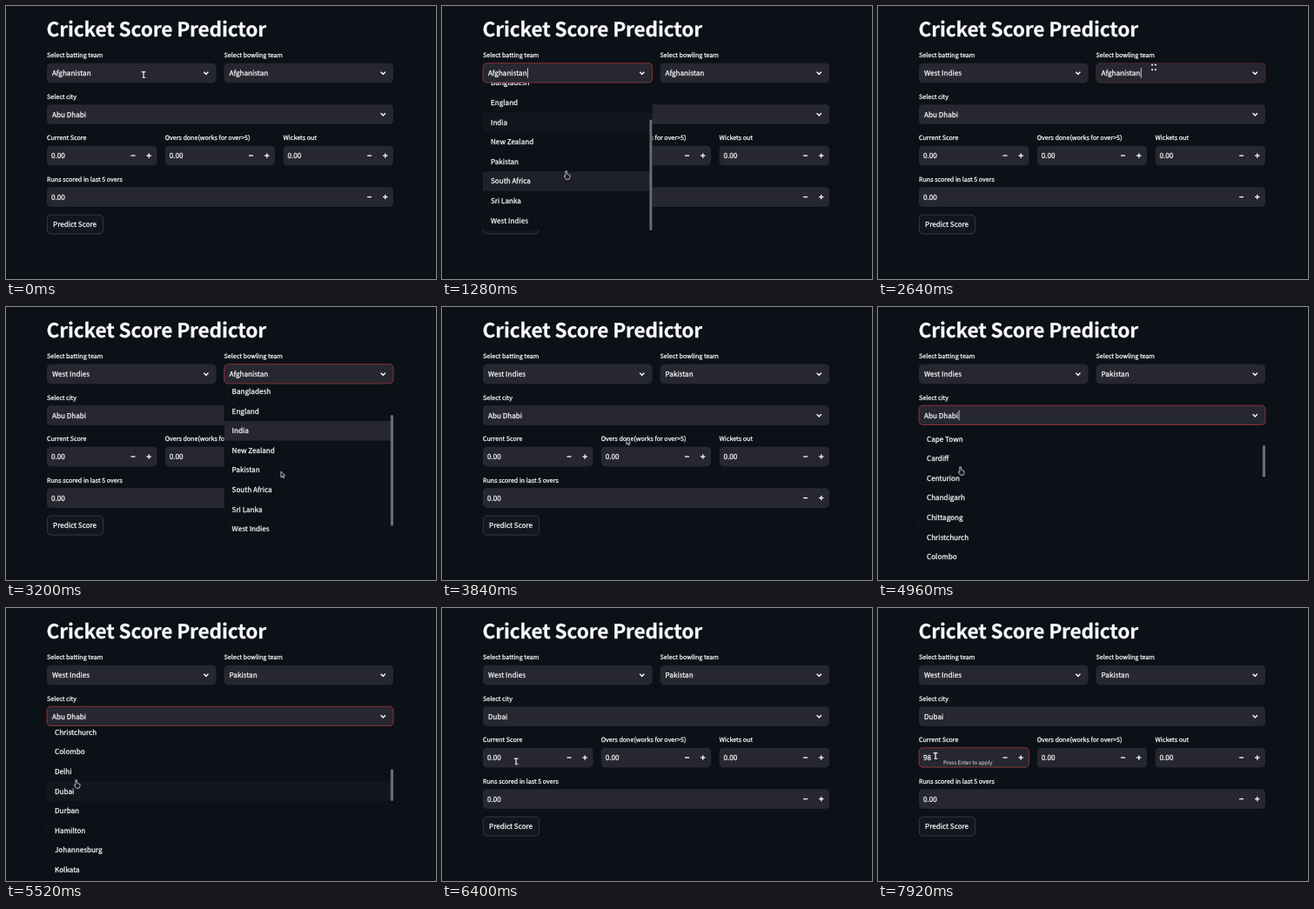
An HTML page with a canvas that plays this animation: 494 by 314 pixels, repeating every 8 s.

```html
<!DOCTYPE html>
<html lang="en">
<head>
<meta charset="utf-8">
<title>Cricket Score Predictor</title>
<style>
html, body { margin: 0; width: 100%; height: 100%; overflow: hidden; background: #0c1017; }
canvas { display: block; width: 494px; height: 314px; }
</style>
</head>
<body>
<canvas id="stage"></canvas>
<script>
const W = 494, H = 314, LOOP = 8000;
const BG = "#0c1017", FIELD = "#262730", TEXT = "#fafafa", FOCUS = "rgba(240,66,66,.65)";
const FAMILY = '"Noto Sans CJK SC","Noto Sans CJK JP","Noto Sans CJK","Noto Sans",sans-serif';
const BODY = 8.12, LABEL = 7.14, HINT = 6.1;
const ROW = 22.6, LIST_H = 169.6, FADE = 200;

const canvas = document.getElementById("stage");
const ctx = canvas.getContext("2d");
const dpr = window.devicePixelRatio || 1;
canvas.width = W * dpr;
canvas.height = H * dpr;

const teams = ["Afghanistan", "Australia", "Bangladesh", "England", "India", "New Zealand",
  "Pakistan", "South Africa", "Sri Lanka", "West Indies"];
const cities = ["Abu Dhabi", "Adelaide", "Auckland", "Bangalore", "Barbados", "Cape Town", "Cardiff",
  "Centurion", "Chandigarh", "Chittagong", "Christchurch", "Colombo", "Delhi", "Dubai", "Durban",
  "Hamilton", "Johannesburg", "Kolkata", "Lahore", "Lauderhill", "London", "Manchester", "Melbourne",
  "Mirpur", "Mount Maunganui", "Mumbai", "Nagpur", "Nottingham", "Pallekele", "Southampton",
  "St Kitts", "St Lucia", "Sydney", "Trinidad", "Wellington"];

const ramp = (t, a, b) => Math.min(1, Math.max(0, (t - a) / (b - a)));
const smooth = (t, a, b) => { const u = ramp(t, a, b); return u * u * (3 - 2 * u); };
const wheel = t => [4580, 4780, 4980, 5180].reduce((sum, s) => sum + smooth(t, s, s + 230), 0);

// hover: [time, row]; blink: [phase, half period]
const selects = [
  { x: 47, y: 65.8, w: 194.6, label: "Select batting team", items: teams, pick: 9,
    focus: 380, open: 460, close: 1920, blink: [600, 260],
    scroll: t => 56.4 * smooth(t, 840, 1120),
    hover: [[460, 0], [660, 1], [720, 2], [780, 3], [840, 4], [1130, 7], [1440, 8], [1560, 9]] },
  { x: 250.6, y: 65.8, w: 194.4, label: "Select bowling team", items: teams, pick: 6,
    focus: 2575, open: 2700, close: 3680, blink: [2560, 180],
    scroll: t => 56.4 * smooth(t, 3040, 3254),
    hover: [[2700, 0], [2880, 2], [2950, 4], [3290, 6]] },
  { x: 47, y: 113.3, w: 398, label: "Select city", items: cities, pick: 13,
    focus: 4040, open: 4160, close: 5760, blink: [4240, 250],
    scroll: t => 57.6 * wheel(t),
    hover: [[4160, 0], [4410, 1], [5470, 13]] }
];

const numbers = [
  { x: 47, y: 160.8, w: 126.5, label: "Current Score" },
  { x: 182.8, y: 160.8, w: 126.2, label: "Overs done(works for over>5)" },
  { x: 318.6, y: 160.8, w: 126.4, label: "Wickets out" },
  { x: 47, y: 208.3, w: 398, label: "Runs scored in last 5 overs" }
];
const ENTRY = { focus: 6640, select: 6880, first: 7760, second: 7840 };

// [time, x, y, shape]
const pointer = [
  [0, 158, 79, "beam"], [480, 158, 79, "beam"], [580, 156, 100, "hand"], [880, 144, 194.5, "hand"],
  [1280, 144, 194.5, "hand"], [1680, 110, 247, "hand"], [1920, 110, 247, "arrow"],
  [2240, 350, 32, "arrow"], [2320, 346, 36, "arrow"], [2480, 319, 68, "dots"],
  [2560, 317, 71, "dots"], [2720, 317, 71, "arrow"], [3020, 317.5, 193, "arrow"],
  [3680, 317.5, 193, "arrow"], [3980, 130, 125, "beam"], [4140, 130, 125, "hand"],
  [4400, 110, 174.5, "hand"], [4560, 110, 174.5, "hand"], [5360, 82, 202.5, "hand"],
  [5800, 82, 202.5, "arrow"], [6320, 90, 178, "beam"], [6600, 66, 170, "beam"], [LOOP, 66, 170, "beam"]
];

// A hairline stroke gives the letters a slightly heavier weight.
function text(str, x, y, size = BODY, color = TEXT, weight = 400) {
  ctx.font = `${weight} ${size}px ${FAMILY}`;
  ctx.fillStyle = ctx.strokeStyle = color;
  ctx.lineWidth = 0.25;
  ctx.fillText(str, x, y);
  ctx.strokeText(str, x, y);
}

function box(x, y, w, h, fill, stroke) {
  ctx.beginPath();
  ctx.roundRect(x, y, w, h, 4.5);
  if (fill) { ctx.fillStyle = fill; ctx.fill(); }
  if (stroke) { ctx.strokeStyle = stroke; ctx.lineWidth = 0.8; ctx.stroke(); }
}

function poly(points, closed) {
  ctx.beginPath();
  points.forEach(([x, y]) => ctx.lineTo(x, y));
  if (closed) ctx.closePath();
}

function line(points, width) {
  poly(points);
  ctx.strokeStyle = TEXT;
  ctx.lineWidth = width;
  ctx.stroke();
}

function withAlpha(alpha, paint) {
  if (alpha <= 0) return;
  ctx.save();
  ctx.globalAlpha *= alpha;
  paint();
  ctx.restore();
}

function focusRing(f, alpha) {
  withAlpha(alpha, () => box(f.x, f.y - 0.1, f.w, 22.4, null, FOCUS));
}

function drawSelect(s, t) {
  text(s.label, s.x, s.y - 6.5, LABEL);
  box(s.x, s.y, s.w, ROW, FIELD);
  const value = s.items[t < s.close ? 0 : s.pick], mid = s.y + 11.3;
  text(value, s.x + 6, mid + 2.9);
  const end = s.x + 6 + ctx.measureText(value).width;
  const cx = s.x + s.w - 11.8;
  line([[cx - 2.6, mid - 1.4], [cx, mid + 1.3], [cx + 2.6, mid - 1.4]], 1.4);
  focusRing(s, ramp(t, s.focus, s.focus + 160) * (1 - ramp(t, s.close, s.close + 160)));
  const lit = Math.floor((t - s.blink[0]) / s.blink[1]) % 2 === 0;
  if (lit && t >= s.focus && t < s.close) {
    ctx.fillStyle = TEXT;
    ctx.fillRect(end + 0.6, mid - 5.8, 0.8, 11.4);
  }
}

function drawList(s, t) {
  const alpha = ramp(t, s.open, s.open + 120) * (1 - ramp(t, s.close, s.close + 100));
  withAlpha(alpha, () => {
    const top = s.y + 22.7, scroll = s.scroll(t), total = s.items.length * ROW;
    ctx.beginPath();
    ctx.rect(s.x, top, s.w, LIST_H);
    ctx.clip();
    ctx.fillStyle = BG;
    ctx.fillRect(s.x - 1, top, s.w + 2, LIST_H);
    s.hover.forEach(([start, row], i) => {
      const next = s.hover[i + 1];
      const on = i ? ramp(t, start, start + FADE) : 1;
      const off = next ? ramp(t, next[0], next[0] + FADE) : 0;
      withAlpha(on * (1 - off), () => {
        ctx.fillStyle = FIELD;
        ctx.fillRect(s.x, top + row * ROW - scroll, s.w, ROW);
      });
    });
    s.items.forEach((item, i) => {
      const y = top + (i + 0.5) * ROW - scroll;
      if (y > top - ROW && y < top + LIST_H + ROW) text(item, s.x + 9, y + 2.8);
    });
    ctx.fillStyle = "#6b6c73";
    ctx.beginPath();
    ctx.roundRect(s.x + s.w - 3.2, top + scroll * LIST_H / total, 3.2, LIST_H * LIST_H / total, 1.2);
    ctx.fill();
  });
}

function drawNumber(n, t, entry) {
  const mid = n.y + 11.3, right = n.x + n.w;
  text(n.label, n.x, n.y - 6.5, LABEL);
  box(n.x, n.y, n.w, ROW, FIELD);
  const typed = entry && t >= ENTRY.first;
  const value = !typed ? "0.00" : t < ENTRY.second ? "9" : "98";
  if (entry && t >= ENTRY.select && !typed) {
    ctx.fillStyle = "#33578f";
    ctx.fillRect(n.x + 5, mid - 5.6, 16.4, 11.2);
  }
  text(value, n.x + 5, mid + 2.9);
  line([[right - 30, mid], [right - 25, mid]], 1.3);
  line([[right - 12, mid], [right - 6.6, mid]], 1.3);
  line([[right - 9.3, mid - 2.7], [right - 9.3, mid + 2.7]], 1.3);
  if (entry) focusRing(n, ramp(t, ENTRY.focus, ENTRY.focus + 160));
  if (typed) text("Press Enter to apply", n.x + 28, mid + 8, HINT, "rgba(250,250,250,.55)");
}

const shapes = {
  beam() {
    line([[-2.5, -3.2], [2.5, -3.2]], 1.1);
    line([[0, -3.4], [0, 3.4]], 1.2);
    line([[-1.2, 3.4], [2.4, 3.4]], 0.9);
  },
  dots() {
    ctx.fillStyle = TEXT;
    for (const x of [-2.2, 1.6]) for (const y of [-3.4, 2.2]) ctx.fillRect(x - 0.8, y - 0.8, 2, 1.7);
  },
  hand() {
    outline([[-2.2, -4.6], [-0.5, -4.6], [-0.3, -1.2], [2.9, 0], [3.2, 2], [2, 4.8],
      [-1.4, 4.8], [-3.7, 1.2], [-2.1, 1]]);
  },
  arrow() {
    outline([[-1.6, -3.8], [-1.6, 2.8], [0, 1.5], [1, 3.8], [2.2, 3.2], [1.2, 1], [3, 0.7]]);
  }
};

function outline(points) {
  poly(points, true);
  ctx.fillStyle = "#1d1626";
  ctx.fill();
  ctx.strokeStyle = "#e2d6e6";
  ctx.lineWidth = 0.8;
  ctx.stroke();
}

function drawPointer(t) {
  const i = pointer.findIndex((key, k) => t >= key[0] && t < pointer[k + 1][0]);
  const [ta, xa, ya, shape] = pointer[i], [tb, xb, yb] = pointer[i + 1];
  const u = smooth(t, ta, tb);
  ctx.save();
  ctx.translate(xa + (xb - xa) * u, ya + (yb - ya) * u);
  shapes[shape]();
  ctx.restore();
}

function draw(t) {
  ctx.setTransform(dpr, 0, 0, dpr, 0, 0);
  ctx.textRendering = "geometricPrecision";
  ctx.lineJoin = "round";
  ctx.fillStyle = BG;
  ctx.fillRect(0, 0, W, H);
  ctx.letterSpacing = "-0.12px";
  text("Cricket Score Predictor", 46.6, 34.6, 22.6, TEXT, 700);
  ctx.letterSpacing = "0px";
  selects.forEach(s => drawSelect(s, t));
  numbers.forEach((n, i) => drawNumber(n, t, i === 0));
  box(47.3, 240.2, 64.4, 22, "#12161e", "rgba(250,250,250,.2)");
  text("Predict Score", 54, 254.2);
  selects.forEach(s => drawList(s, t));
  drawPointer(t);
}

const began = performance.now();
function tick() {
  draw((performance.now() - began) % LOOP);
  requestAnimationFrame(tick);
}
tick();
</script>
</body>
</html>
```
